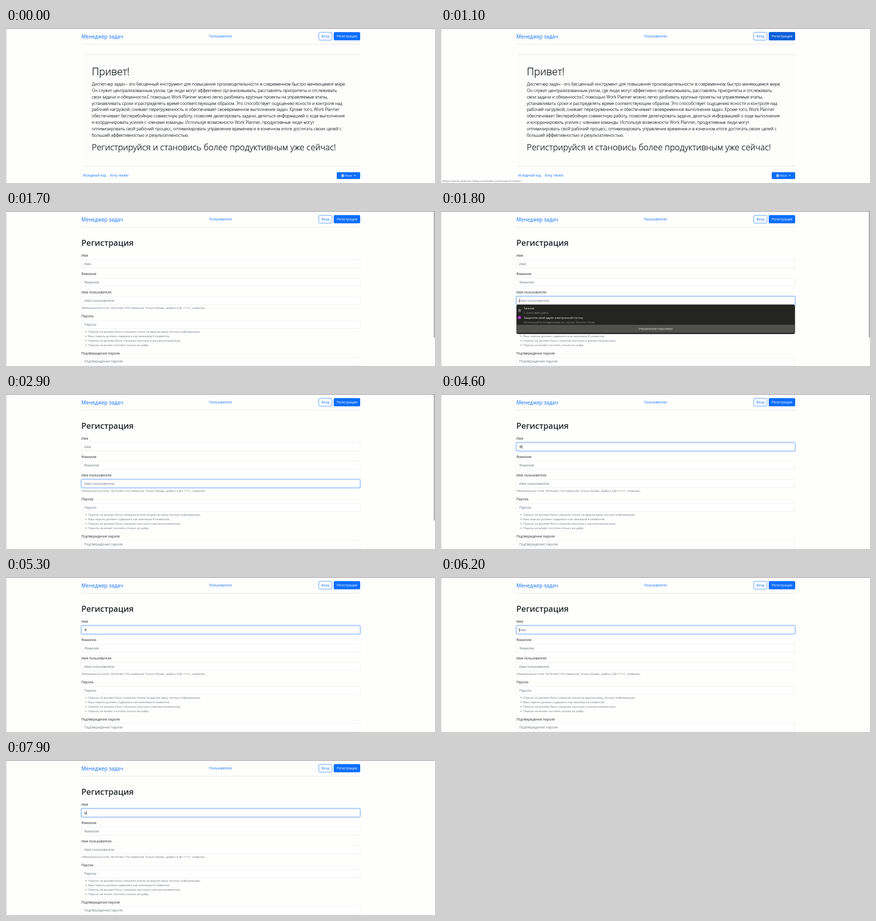
An HTML page for the animation above (8000 ms loop, 860x312 px).

```html
<!DOCTYPE html>
<html lang="ru">
<head>
<meta charset="utf-8">
<title>Менеджер задач</title>
<style>
  html, body { margin: 0; width: 100%; height: 100%; overflow: hidden; background: #fefefd; }
  svg { display: block; width: 860px; height: 312px; font-family: "Open Sans", "Noto Sans", sans-serif; }
</style>
</head>
<body>
<svg id="stage" viewBox="0 0 860 312"></svg>
<script>
const LOOP = 8000;
const BLUE = '#0d6efd', INK = '#212529', GREY = '#6c757d';

const intro = [
  'Диспетчер задач - это бесценный инструмент для повышения производительности в современном быстро меняющемся мире.',
  'Он служит централизованным узлом, где люди могут эффективно организовывать, расставлять приоритеты и отслеживать',
  'свои задачи и обязанности.С помощью Work Planner можно легко разбивать крупные проекты на управляемые этапы,',
  'устанавливать сроки и распределять время соответствующим образом. Это способствует ощущению ясности и контроля над',
  'рабочей нагрузкой, снижает перегруженность и обеспечивает своевременное выполнение задач. Кроме того, Work Planner',
  'обеспечивает бесперебойную совместную работу, позволяя делегировать задачи, делиться информацией о ходе выполнения',
  'и координировать усилия с членами команды. Используя возможности Work Planner, продуктивные люди могут',
  'оптимизировать свой рабочий процесс, оптимизировать управление временем и в конечном итоге достигать своих целей с',
  'большей эффективностью и результативностью.'
];
const rules = [
  'Пароль не должен быть слишком похож на другую вашу личную информацию.',
  'Ваш пароль должен содержать как минимум 8 символов.',
  'Пароль не должен быть слишком простым и распространенным.',
  'Пароль не может состоять только из цифр.'
];
// label, label centre, input centre
const fields = [
  ['Имя', 89.5, 106.3],
  ['Фамилия', 126.5, 143.2],
  ['Имя пользователя', 163.3, 180.3],
  ['Пароль', 211.3, 228.3],
  ['Подтверждение пароля', 286.3, 303]
];

// Scale each font weight so that its average advance (in em) suits the layout.
const pen = document.createElement('canvas').getContext('2d');
function fontScale(weight, sample, advance) {
  pen.font = `${weight} 100px "Open Sans", "Noto Sans", sans-serif`;
  return advance * 100 * sample.length / pen.measureText(sample).width;
}
const scale = {
  300: fontScale(300, intro[0], 0.525),
  400: fontScale(400, rules[0], 0.543),
  600: fontScale(600, 'Регистрация', 0.555)
};

// y is the middle of the capitals; light text gets a hairline to thicken it
function text(x, y, size, str, fill = INK, weight = 400, extra = '') {
  const stroke = weight === 300 ? `stroke="${fill}" stroke-width="${size * 0.02}"` : '';
  return `<text x="${x}" y="${y + size * 0.35}" font-size="${size * scale[weight]}"
    font-weight="${weight}" fill="${fill}" ${stroke} ${extra}>${str}</text>`;
}
const middle = 'text-anchor="middle"';

function rect(x, y, w, h, fill, extra = '') {
  return `<rect x="${x}" y="${y}" width="${w}" height="${h}" fill="${fill}" ${extra}/>`;
}
const rule = (y, x = 151) => rect(x, y, 710 - x, 0.6, '#d9dbdd');

function globe(x, y, r, color) {
  return `<g fill="none" stroke="${color}" stroke-width=".6"><circle cx="${x}" cy="${y}" r="${r}"/>
    <ellipse cx="${x}" cy="${y}" rx="${r * 0.45}" ry="${r}"/>
    <path d="M${x - r} ${y}h${2 * r}M${x} ${y - r}v${2 * r}"/></g>`;
}

const header =
  rect(0, 0, 860, 0.7, '#54464f') + rect(0, 1, 0.6, 311, '#bbb') +
  text(151, 17, 10.65, 'Менеджер задач', BLUE) +
  text(430, 16.7, 6.9, 'Пользователи', BLUE, 400, middle) +
  rect(627, 8.7, 26.6, 15.7, '#fff', `rx="2.4" stroke="${BLUE}" stroke-width=".7"`) +
  text(640.3, 16.7, 6.9, 'Вход', BLUE, 400, middle) +
  rect(657, 8.3, 53, 16.5, BLUE, 'rx="2.6"') +
  rect(657, 8.3, 53, 16.5, '#0b5ed7', 'id="hover" rx="2.6"') +
  text(683.5, 16.7, 6.9, 'Регистрация', '#fff', 400, middle) +
  rule(32);

const home = rect(152, 54, 558, 223, '#fdfdfc') + rule(53.3, 154) + rule(277.2, 154) +
  text(172, 87.5, 20.7, 'Привет!', INK, 300) +
  intro.map((line, i) => text(172, 112.7 + i * 12.93, 8.6, line, INK, 300)).join('') +
  text(172, 240, 17.3, 'Регистрируйся и становись более продуктивным уже сейчас!', INK, 300) +
  text(154.5, 297, 6.9, 'Исходный код', BLUE) +
  text(208, 297, 6.9, 'Хочу также!', BLUE) +
  rect(663, 290.3, 47, 13.6, BLUE, 'rx="1.8"') +
  globe(675, 297.2, 2.8, '#fff') +
  text(679.8, 297.2, 6.03, 'Язык', '#fff') +
  '<path d="M697.3 296.3h3.8l-1.9 1.9z" fill="#fff"/>' +
  '<g id="status">' + rect(0, 304, 163, 8, '#fafafa') +
  text(2, 308.2, 6.4, 'https://work-planner-t0wy.onrender.com/users/create/', '#808080') + '</g>';

const form = text(151, 64, 17.2, 'Регистрация', INK, 600) +
  fields.map(([label, ly, iy], i) =>
    text(151, ly, 6.9, label) +
    rect(151.2, iy - 8.2, 558.6, 16.4, '#fff', 'rx="2.5" stroke="#e6e8e9" stroke-width=".6"') +
    text(156.7, iy, 6.9, label, GREY, 400, `id="hint${i}"`)).join('') +
  text(151, 195.2, 6.03, 'Обязательное поле. Не более 150 символов. Только буквы, цифры и @/./+/-//_ символы.', GREY) +
  rules.map((line, i) => {
    const y = 242.6 + i * 9.05;
    return `<circle cx="160.4" cy="${y + 0.3}" r=".95" fill="${GREY}"/>` + text(165, y, 6.03, line, GREY);
  }).join('') +
  '<g id="focus">' +
  rect(150.3, -9.1, 560.4, 18.2, 'none', 'rx="3.2" stroke="#0d6efd" stroke-opacity=".25" stroke-width="1.7"') +
  rect(151.2, -8.2, 558.6, 16.4, 'none', 'rx="2.5" stroke="#86b7fe" stroke-width=".8"') +
  text(156.7, 0, 6.9, '', INK, 400, 'id="value"') +
  rect(156.5, -3.8, 0.8, 7.6, '#222', 'id="caret"') + '</g>' +
  rect(857.8, 1, 1.6, 254, '#8b8b90', 'id="scrollbar" rx=".8"') +
  '<g id="popup">' +
  rect(151.4, 188.6, 558, 58.8, '#242421', 'rx="3" stroke="#4b4b48" stroke-width=".7"') +
  globe(157.6, 200.3, 2.9, '#999') +
  text(166, 196.3, 6.03, 'Tarevok', '#f4f4f2') +
  text(166, 204.6, 6.03, 'С этого веб-сайта', '#96968f') +
  '<circle cx="157.3" cy="214.5" r="3.1" fill="#b53be0"/>' +
  text(166, 215, 6.03, 'Защитите свой адрес электронной почты:', '#f4f4f2') +
  text(166, 223.4, 6.03, 'Используйте псевдонимы эл. почты Tavomir Cloak', '#96968f') +
  rect(152, 229, 556.8, 16, '#50504d') +
  text(430, 237.2, 6.4, 'Управление паролями', '#efefec', 400, middle) + '</g>';

const stage = document.getElementById('stage');
stage.innerHTML = header + `<g id="home">${home}</g><g id="form">${form}</g>`;
const el = id => document.getElementById(id);
const show = (id, on) => el(id).style.display = on ? '' : 'none';

// start time, focused field, typed value
const edits = [[1750, 2, ''], [3450, 0, ''], [4550, 0, 'Ф'], [6150, 0, ''], [7850, 0, 'Ь']];

function draw(t) {
  const onHome = t < 1550;
  show('home', onHome);
  show('form', !onHome);
  show('status', t >= 1050);
  show('popup', t >= 1750 && t < 2850);
  show('scrollbar', t < 4050);
  el('hover').setAttribute('opacity', onHome ? Math.min(1, Math.max(0, (t - 950) / 150)) : 0);

  const edit = edits.filter(e => e[0] <= t).pop();
  show('focus', edit);
  const [start, field, value] = edit || [0, -1, ''];
  fields.forEach((_, i) => show('hint' + i, i !== field || !value));
  if (!edit) return;
  el('focus').setAttribute('transform', `translate(0 ${fields[field][2]})`);
  el('value').textContent = value;
  el('caret').setAttribute('x', 156.5 + (value ? el('value').getComputedTextLength() : 0));
  show('caret', (t - start) % 1200 < 600);
}

const begin = performance.now();
function tick() {
  draw((performance.now() - begin) % LOOP);
  requestAnimationFrame(tick);
}
tick();
</script>
</body>
</html>
```
